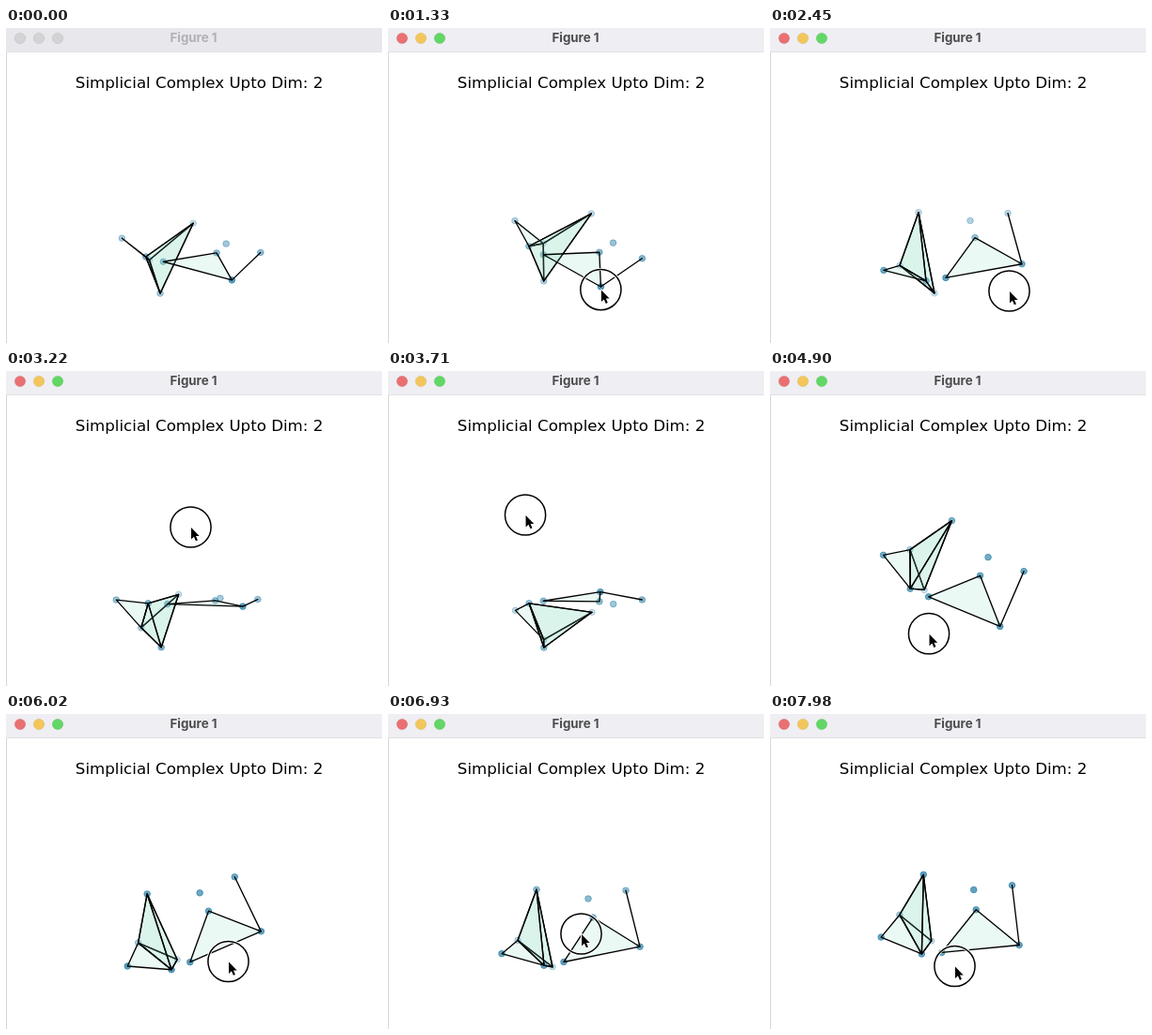
These frames come from a looping animation (400x336 px, 8000 ms). An HTML page with a canvas:

```html
<!DOCTYPE html>
<html lang="en">
<head>
<meta charset="utf-8">
<title>Simplicial complex</title>
<style>
  html, body { margin: 0; width: 100%; height: 100%; overflow: hidden; background: #fff; }
  canvas { display: block; width: 400px; height: 336px; }
</style>
</head>
<body>
<canvas id="stage" width="400" height="336"></canvas>
<script>
const ctx = document.getElementById('stage').getContext('2d');
const LOOP = 8000, STEP = 70, PRESS = 560;
const CENTER = { x: 212, y: 220.5 }, PLANE = 25.5, SQUASH = 0.97;
const FACE = 'rgba(155,222,198,0.2)';
const ARROW = new Path2D('M0 0V12.5L2.9 9.8L4.9 14.3L6.9 13.4L5 9H8.7Z');

// Points lie in one plane (right, away), two of them hang below it (drop)
const points = {
  P: [-54, 43.5], Q: [-74, -5, 31.7], R: [-37, -30.5, 48], S: [-46, -43.5], T: [-91, -30],
  U: [6, 11.5], V: [56, -22], W: [-25, -39.5], I: [41, 42.5], J: [1, 33]
};
const simplices = 'PQR PQS PRS QRS QST UVW VI'.split(' ');

// Turning points of the drag
const drag = [
  { t: 560, turn: 40.5, tilt: 31, x: 270, y: 265 },
  { t: 1400, turn: 55, tilt: 40, x: 226, y: 280 },
  { t: 2450, turn: 0, tilt: 60, x: 255, y: 281 },
  { t: 3220, turn: 27, tilt: 7, x: 197, y: 167 },
  { t: 4200, turn: 73.6, tilt: -18, x: 115.5, y: 149 },
  { t: 5200, turn: 17, tilt: 110, x: 196, y: 317 },
  { t: 6020, turn: -12, tilt: 86, x: 237, y: 264.5 },
  { t: 6930, turn: 0, tilt: 73.5, x: 206, y: 235 },
  { t: 7980, turn: 6.5, tilt: 93, x: 197, y: 269.5 }
];

// Harmonic mean of the neighbouring slopes, flat where the direction reverses
function slope(k, part) {
  const [a, b, c] = [drag[k - 1], drag[k], drag[k + 1]];
  if (!a || !c) return 0;
  const before = (b[part] - a[part]) / (b.t - a.t);
  const after = (c[part] - b[part]) / (c.t - b.t);
  return before * after > 0 ? 2 * before * after / (before + after) : 0;
}

// Monotone cubic through the turning points
function sample(t, part) {
  const next = drag.findIndex(key => key.t > t);
  if (next === 0) return drag[0][part];
  if (next < 0) return drag[drag.length - 1][part];
  const a = drag[next - 1], b = drag[next], span = b.t - a.t;
  const u = (t - a.t) / span, v = 1 - u;
  return v * v * (1 + 2 * u) * a[part] + u * u * (3 - 2 * u) * b[part]
    + span * u * v * (v * slope(next - 1, part) - u * slope(next, part));
}

function project([right, away, drop = 0], turn, tilt) {
  const ct = Math.cos(turn), st = Math.sin(turn);
  const ce = Math.cos(tilt), se = Math.sin(tilt);
  const near = right * st - away * ct;
  return {
    x: CENTER.x + right * ct + away * st,
    y: CENTER.y + (PLANE + drop) * ce + SQUASH * near * se,
    depth: near * ce - drop * se
  };
}

const byDepth = (a, b) => a.depth - b.depth;

function disc(x, y, r, fill, stroke, width = 1) {
  ctx.beginPath();
  ctx.arc(x, y, r, 0, Math.PI * 2);
  if (fill) { ctx.fillStyle = fill; ctx.fill(); }
  if (stroke) { ctx.strokeStyle = stroke; ctx.lineWidth = width; ctx.stroke(); }
}

function label(text, x, y, font, color) {
  ctx.font = font;
  ctx.fillStyle = color;
  ctx.textAlign = 'center';
  ctx.fillText(text, x, y);
}

function drawWindow(active) {
  ctx.fillStyle = '#fff';
  ctx.fillRect(0, 0, 400, 336);
  ctx.fillStyle = '#d6d5d7';
  ctx.fillRect(0, 0, 1, 336);
  ctx.fillStyle = active ? '#efeef2' : '#e8e7ec';
  ctx.fillRect(0, 0, 400, 25);
  ctx.fillStyle = '#e2e1e4';
  ctx.fillRect(0, 25, 400, 1);
  ['#ea6f72', '#f3c65b', '#61d765'].forEach((color, n) =>
    disc(15 + 20 * n, 11, 5.8, active ? color : '#d3d2d5', 'rgba(0,0,0,0.08)', 0.8));
  label('Figure 1', 199.5, 14.8, 'bold 13.3px Inter, sans-serif', active ? '#4c4b4d' : '#b2b0b3');
  label('Simplicial Complex Upto Dim: 2', 205.6, 63.8, '16.67px "DejaVu Sans", sans-serif', '#000');
}

function drawComplex(turn, tilt) {
  const view = {};
  for (const name in points) view[name] = project(points[name], turn, tilt);

  const dots = Object.values(view).sort(byDepth);
  const far = dots[0].depth, range = dots[dots.length - 1].depth - far;
  for (const d of dots) {
    const alpha = 0.25 + 0.5 * (d.depth - far) / range;
    const color = `rgba(45,130,168,${alpha})`;
    disc(d.x, d.y, 3.3, color, color);
  }

  const shapes = simplices.map(names => {
    const corners = [...names].map(name => view[name]);
    const depth = corners.reduce((sum, p) => sum + p.depth, 0) / corners.length;
    return { corners, depth };
  }).sort(byDepth);

  ctx.lineJoin = ctx.lineCap = 'round';
  ctx.fillStyle = FACE;
  ctx.strokeStyle = '#000';
  ctx.lineWidth = 1.35;
  for (const { corners } of shapes) {
    ctx.beginPath();
    corners.forEach(p => ctx.lineTo(p.x, p.y));
    ctx.closePath();
    ctx.fill();
    ctx.stroke();
  }
}

function drawPointer(x, y, pressed) {
  if (pressed) {
    disc(x - 0.5, y - 0.5, 21.6, null, '#fff', 3.2);
    disc(x - 0.5, y - 0.5, 21.6, null, '#000', 1.5);
  }
  ctx.save();
  ctx.translate(x, y);
  ctx.strokeStyle = '#fff';
  ctx.lineWidth = 2;
  ctx.stroke(ARROW);
  ctx.fillStyle = '#000';
  ctx.fill(ARROW);
  ctx.restore();
}

function draw(now) {
  const t = Math.floor((now % LOOP) / STEP) * STEP;
  const rad = Math.PI / 180, active = t >= PRESS;
  const approach = Math.max(0, 1 - t / 420) ** 2;
  drawWindow(active);
  drawComplex(sample(t, 'turn') * rad, sample(t, 'tilt') * rad);
  if (t > 0) drawPointer(sample(t, 'x') + 42 * approach, sample(t, 'y') + 24 * approach, active);
}

const start = performance.now();
function tick() {
  draw(performance.now() - start);
  requestAnimationFrame(tick);
}
tick();
</script>
</body>
</html>
```
